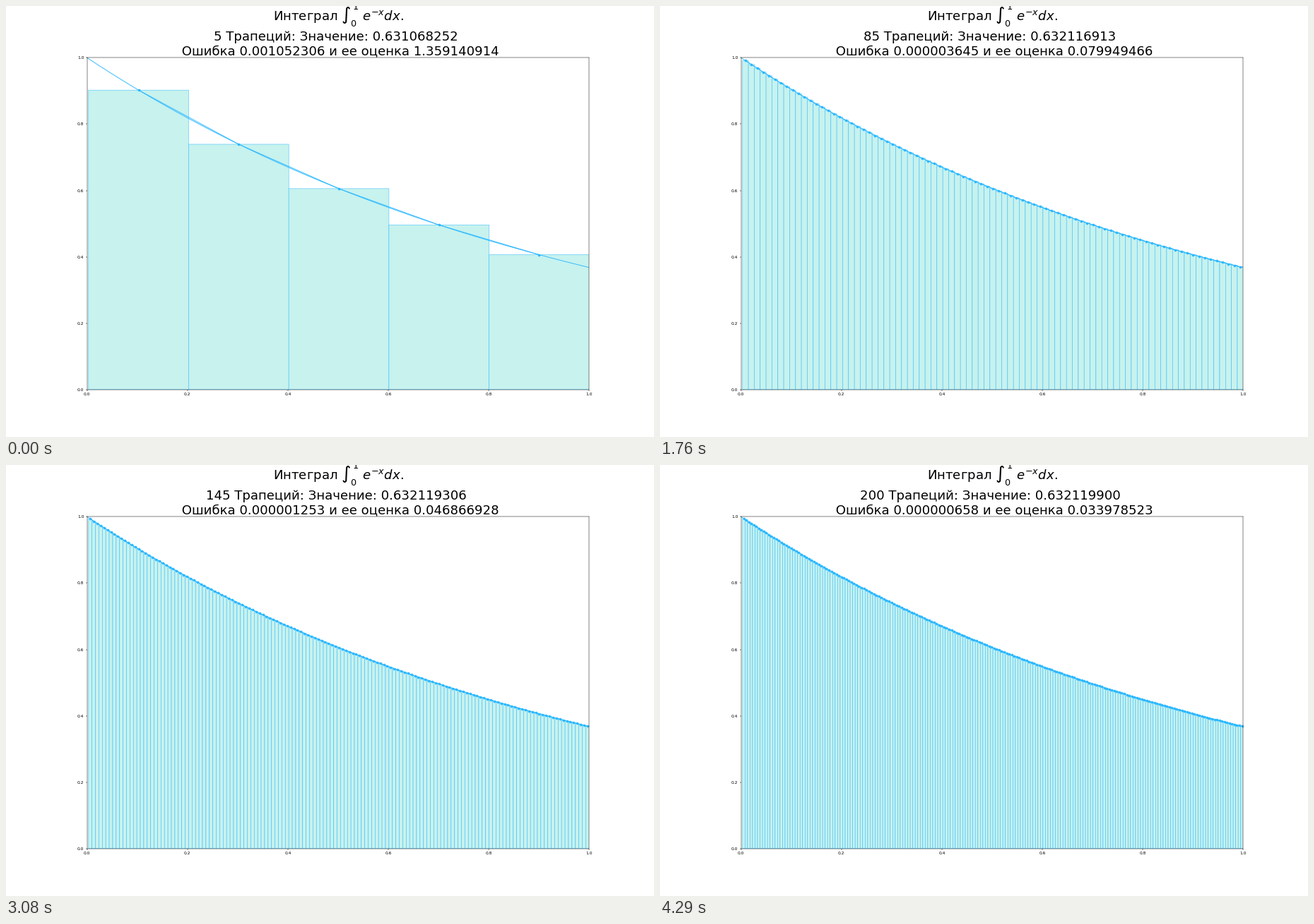
Write a matplotlib script that moves like this. It is 917 px wide and 611 px high and loops after 4.4 s.

```python
import numpy as np
import matplotlib.pyplot as plt
from matplotlib.animation import FuncAnimation
from matplotlib.collections import PolyCollection

plt.rcParams["font.family"] = "DejaVu Sans"

DPI = 917 / 21
FRAMES, INTERVAL, STEP = 40, 110, 5
START, END = 0.003, 1.0
BLUE, FILL = "#2bb8ff", "#c7f2ee"
EXACT = 1 - np.exp(-1)


def f(x):
    return np.exp(-x)


def midpoint_sum(n):
    return f((np.arange(n) + 0.5) / n).mean()


def bar_corners(edges, heights):
    return [[(l, 0), (l, h), (r, h), (r, 0)]
            for l, r, h in zip(edges[:-1], edges[1:], heights)]


def title(n):
    value = midpoint_sum(n)
    bound = 2.5 * np.e / n
    return (r"Интеграл $\int_0^1~e^{-x}dx$."
            f"\n{n} Трапеций: Значение: {value:.9f} "
            f"\n Ошибка {EXACT - value:.9f} и ее оценка {bound:.9f}")


fig, ax = plt.subplots(figsize=(917 / DPI, 611 / DPI), dpi=DPI)
fig.subplots_adjust(left=0.125, right=0.9, bottom=0.11, top=0.88)
ax.set(xlim=(0, 1), ylim=(0, 1))

bars = PolyCollection([], facecolors=FILL, edgecolors=[(BLUE, 0.8)],
                      linewidths=1, zorder=1)
bars.set_snap(False)
ax.add_collection(bars, autolim=False)

xs = np.linspace(0, 1, 200)
ax.plot(xs, f(xs), color=BLUE, lw=1.5)
chords, = ax.plot([], [], color=BLUE, lw=1.5, marker="o", markersize=5)


def update(i):
    n = STEP * (i + 1)
    edges = np.linspace(START, END, n + 1)
    mids = (edges[:-1] + edges[1:]) / 2
    bars.set_verts(bar_corners(edges, f(mids)))
    chords.set_data(mids, f(mids))
    ax.set_title(title(n), fontsize=30)
    return bars, chords


anim = FuncAnimation(fig, update, frames=FRAMES, interval=INTERVAL,
                     repeat=True, repeat_delay=0, blit=False)
plt.show()
```
